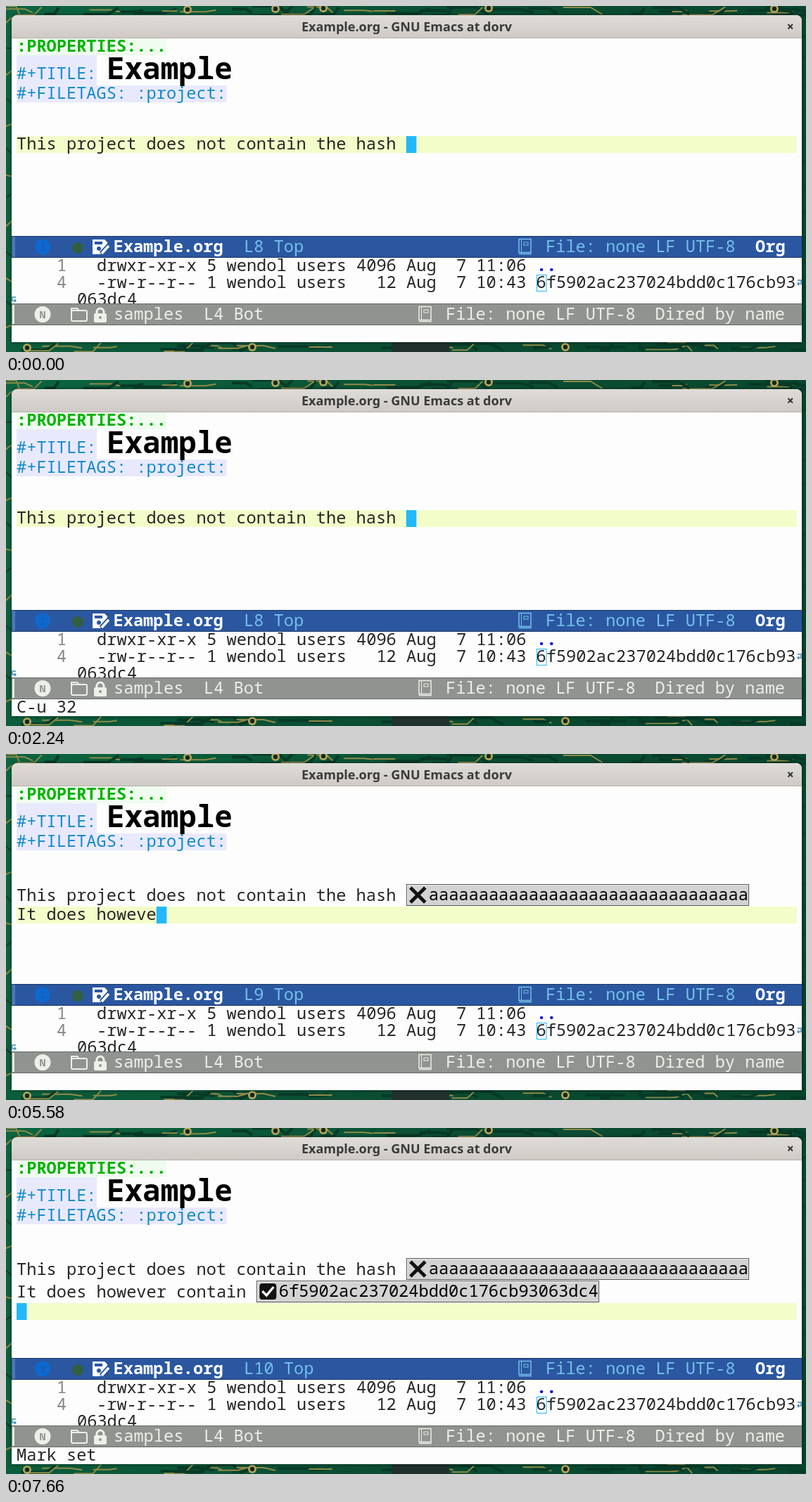
Recreate the animation shown at these times as an HTML page with a canvas. Size 1137 px wide and 492 px high, loop 8 s.

```html
<!DOCTYPE html>
<html lang="en">
<head>
<meta charset="utf-8">
<title>Editor session</title>
<style>
html, body { margin: 0; width: 100%; height: 100%; overflow: hidden; background: #0b5a3a; }
canvas { display: block; width: 1137px; height: 492px; }
</style>
</head>
<body>
<canvas id="stage" width="1137" height="492"></canvas>
<script>
const ctx = document.getElementById('stage').getContext('2d');
const LOOP = 8000, CELL = 14.2, ROW = 24, LEFT = 15, SIZE = CELL / 0.6;
const MONO = '"Noto Sans Mono", "DejaVu Sans Mono", monospace';
const INK = '#262626', PAPER = '#fdfdfd', CURSOR = '#22b8fb', HL = '#f3fdc9';
const HASH = '6f5902ac237024bdd0c176cb93063dc4';
const FIRST = 'This project does not contain the hash ';
const SECOND = 'It does however contain ';

// Bursts of typing: first key, last key, number of keys
const BURSTS = [[4190, 4390, 3], [4550, 4720, 3], [4820, 5310, 6], [5510, 5580, 2], [5740, 6470, 10]];
const ECHO = [[0, ''], [1750, 'C-u-'], [1880, 'C-u 3'], [2210, 'C-u 32'], [2610, 'C-u 32 a'], [3630, ''], [7620, 'Mark set']];

const col = n => LEFT + n * CELL;

function rect(x, y, w, h, color) {
  ctx.fillStyle = color;
  ctx.fillRect(x, y, w, h);
}

function text(s, x, y, color = INK, weight = 400, size = SIZE) {
  ctx.font = `${weight} ${size}px ${MONO}`;
  ctx.fillStyle = color;
  ctx.fillText(s, x, y);
}

function disc(x, y, r, color) {
  ctx.fillStyle = color;
  ctx.beginPath();
  ctx.arc(x, y, r, 0, 7);
  ctx.fill();
}

function line(points, color, width) {
  ctx.strokeStyle = color;
  ctx.lineWidth = width;
  ctx.beginPath();
  points.forEach(([x, y]) => ctx.lineTo(x, y));
  ctx.stroke();
}

function frameBox(x, y, w, h, color, width = 1) {
  ctx.strokeStyle = color;
  ctx.lineWidth = width;
  ctx.strokeRect(x, y, w, h);
}

function rounded(x, y, w, h, r, color) {
  ctx.fillStyle = color;
  ctx.beginPath();
  ctx.roundRect(x, y, w, h, r);
  ctx.fill();
}

function board() {
  const shade = ctx.createLinearGradient(0, 0, 1137, 492);
  shade.addColorStop(0, '#0a6540');
  shade.addColorStop(0.5, '#0b4e33');
  shade.addColorStop(1, '#07442c');
  rect(0, 0, 1137, 492, shade);
  let seed = 11;
  const rnd = () => (seed = seed * 16807 % 2147483647) / 2147483647;
  for (let i = 0; i < 84; i++) {
    const x = rnd() * 1137, y = i % 2 ? 478 : 0, w = 18 + rnd() * 45, a = rnd() * 14;
    const gold = i % 5 < 2;
    line([[x, y + a], [x + w * 0.7, y + a], [x + w, y + 14 - a]], gold ? '#8f8a48' : '#073a27', gold ? 2 : 4);
  }
  for (let i = 0; i < 26; i++) {
    const y = 20 + i * 18 + rnd() * 8, x = i % 2 ? 1131 : 0;
    line([[x, y], [x + 8, y + (rnd() - 0.5) * 16]], i % 4 ? '#073f2a' : '#8d8a45', 2);
  }
  for (const [x, y] of [[258, 5], [383, 4], [451, 3], [686, 3], [1092, 4], [30, 486], [350, 485], [795, 485]]) {
    disc(x, y, 6, '#b5a65b');
    disc(x, y, 3.2, '#14291d');
  }
  rect(548, 478, 82, 14, '#20302c');
}

function windowFrame(title) {
  ctx.save();
  ctx.shadowColor = 'rgba(0,0,0,.5)';
  ctx.shadowBlur = 5;
  rounded(8, 13, 1123, 465, [8, 8, 0, 0], PAPER);
  ctx.restore();
  const bar = ctx.createLinearGradient(0, 13, 0, 45);
  bar.addColorStop(0, '#dfdcd8');
  bar.addColorStop(1, '#cfcac5');
  rounded(8, 13, 1123, 32, [8, 8, 0, 0], bar);
  rect(8, 45, 1123, 1, '#b5afaa');
  ctx.font = '600 18px "Noto Sans", "Open Sans", sans-serif';
  ctx.fillStyle = '#3a3a3a';
  ctx.textAlign = 'center';
  ctx.fillText(title + ' - GNU Emacs at dorv', 569.5, 36);
  ctx.textAlign = 'left';
  line([[1111.5, 26], [1118, 32.5]], '#333', 2);
  line([[1118, 26], [1111.5, 32.5]], '#333', 2);
}

function header() {
  rect(15, 46, 213, ROW, '#effcef');
  text(':PROPERTIES:...', 15, 64.5, '#00b300', 700);
  rect(15, 70, 114, 43, '#e9e9fd');
  rect(15, 113, 298.5, ROW, '#e9e9fd');
  text('#+TITLE:', 15, 104, '#118bcb');
  text('Example', 143, 104, '#000', 700, SIZE * 1.8);
  text('#+FILETAGS: :project:', 15, 131.5, '#118bcb');
}

const highlight = (y, h = ROW) => rect(15, y, 1109, h, HL);
const cursor = (n, y, h = ROW) => rect(col(n), y, CELL + 0.3, h, CURSOR);

function button(n, y, label, found, raised) {
  const x = col(n) + 0.5, w = CELL * 34.25;
  if (raised) {
    rect(x, y, w, 30, '#d3d3d3');
    line([[x + 1, y + 29], [x + 1, y + 1.5], [x + w, y + 1.5]], '#f0f0f0', 1);
  }
  frameBox(x, y + 0.5, w, 30, '#555');
  if (found) {
    rounded(x + 4, y + 4, 24, 23, 4, '#111');
    line([[x + 8, y + 15], [x + 14, y + 21], [x + 24, y + 9]], '#fff', 3.4);
  } else {
    line([[x + 5.5, y + 5], [x + 26.5, y + 26]], '#111', 5);
    line([[x + 26.5, y + 5], [x + 5.5, y + 26]], '#111', 5);
  }
  text(label, col(n + 2.25), y + 23, '#000');
}

function typedCount(t) {
  return BURSTS.reduce((sum, [a, b, n]) =>
    sum + (t < a ? 0 : Math.min(n, 1 + Math.floor((t - a) * (n - 1) / (b - a) + 1e-6))), 0);
}

function body(t, prompting) {
  const as = 'a'.repeat(32);
  if (t < 3100) {
    highlight(185);
    const line1 = FIRST + (t < 2610 ? '' : as);
    text(line1, LEFT, 203.5);
    cursor(line1.length, 185);
    return;
  }
  const firstLine = t < 3630;
  if (firstLine) highlight(185, 32);
  text(FIRST, LEFT, 208.5);
  button(39, 185, as, false, !firstLine);
  if (firstLine) {
    cursor(73.3, 185, 32);
  } else if (t < 7620) {
    const n = typedCount(t);
    highlight(217);
    text(SECOND.slice(0, n), LEFT, 235.5);
    if (prompting) frameBox(col(n) + 0.5, 217.5, 13.5, ROW - 1, CURSOR);
    else cursor(n, 217);
  } else {
    text(SECOND, LEFT, 240.5);
    button(24, 217, HASH, true, true);
    highlight(249);
    cursor(0, 249);
  }
}

function book(x, y, color) {
  frameBox(x, y - 10.5, 17, 19, color, 1.5);
  line([[x, y + 10.5], [x + 18, y + 10.5]], color, 1.5);
  line([[x + 3.5, y - 10], [x + 3.5, y + 8]], color, 1);
  frameBox(x + 7, y - 6, 6, 4, color, 1);
}

function modeBar(y, color, edge) {
  rect(8, y, 1123, 31, color);
  rect(8, y, 1123, 1, edge);
  rect(8, y + 30, 1123, 1, edge);
}

function activeBar(row) {
  const sky = '#74c0ea', blue = '#2b57a0';
  modeBar(327, blue, '#183665');
  rect(9, 328, 4, 29, '#4e77b6');
  disc(52, 342.5, 11, '#0d68d0');
  text('I', 48, 348, '#1c5db8', 700, 14);
  disc(102, 344, 8, '#315f40');
  ctx.fillStyle = '#fff';
  ctx.beginPath();
  [[123, 332], [140, 332], [144, 336], [144, 340], [134, 353], [123, 353]].forEach(p => ctx.lineTo(...p));
  ctx.fill();
  rect(126, 335, 11, 4, blue);
  disc(132, 345, 3, blue);
  line([[135, 352], [146, 340]], blue, 6);
  line([[136, 352], [146, 341]], '#fff', 3.5);
  text('Example.org', 152.5, 350, '#fff', 700);
  text(`L${row} Top`, 338, 350, sky);
  book(729, 342, sky);
  text('File: none LF UTF-8', 767, 350, sky);
  text('Org', 1065, 350, '#fff', 700);
}

function wrapMark(x, y, dir) {
  line([[x - 3 * dir, y - 3], [x + 2 * dir, y - 3], [x + 2 * dir, y + 2], [x - 3 * dir, y + 2]], '#3b8bc0', 1.4);
  line([[x - dir, y], [x - 3 * dir, y + 2], [x - dir, y + 4]], '#3b8bc0', 1.4);
}

function listing() {
  ctx.save();
  ctx.beginPath();
  ctx.rect(8, 358, 1123, 65);
  ctx.clip();
  rect(8, 358, 1123, 65, PAPER);
  text('1', 72, 377, '#858585');
  text('drwxr-xr-x 5 wendol users 4096 Aug  7 11:06', 129, 377);
  text('..', 754, 377, '#0000d4', 700);
  text('4', 72, 401, '#858585');
  text('-rw-r--r-- 1 wendol users   12 Aug  7 10:43 ' + HASH.slice(0, 26), 129, 401);
  frameBox(754.5, 382.5, 13.5, ROW - 1, CURSOR);
  text(HASH.slice(26), 101, 425);
  wrapMark(1128, 393, 1);
  wrapMark(11, 417, -1);
  ctx.restore();
}

function idleBar() {
  const pale = '#edf0e8', gray = '#90938f';
  modeBar(423, gray, '#666b68');
  rect(9, 425, 3, 27, '#e4e8e2');
  disc(52, 438.5, 11.5, pale);
  text('N', 47.6, 444, gray, 700, 15);
  ctx.strokeStyle = pale;
  ctx.lineWidth = 2;
  ctx.beginPath();
  ctx.roundRect(93, 433, 22, 15, 2);
  ctx.stroke();
  line([[93, 435], [93, 430], [101, 430], [104, 433]], pale, 2);
  rounded(125, 437, 18, 13, 2, pale);
  ctx.strokeStyle = pale;
  ctx.lineWidth = 3;
  ctx.beginPath();
  ctx.arc(134, 435, 5, Math.PI, 0);
  ctx.lineTo(139, 438);
  ctx.moveTo(129, 435);
  ctx.lineTo(129, 438);
  ctx.stroke();
  disc(134, 443, 2, gray);
  text('samples', 153, 446, pale);
  text('L4 Bot', 281, 446, pale);
  book(587, 438, pale);
  text('File: none LF UTF-8', 625, 446, pale);
  text('Dired by name', 922.5, 446, pale);
}

function prompt() {
  rect(15, 426, 28 * CELL, ROW, '#ffd200');
  text('1/1    Yank from kill-ring: ', 15, 444.5, '#262000', 700);
  cursor(28, 426);
  rect(15, 450, 1109, 28, '#b2d4fc');
  text(HASH, 15, 472.5);
  const x = col(32);
  line([[x + 11, 459], [x + 11, 468], [x + 3, 468]], '#8a93a0', 1.6);
  line([[x + 7, 464], [x + 3, 468], [x + 7, 472]], '#8a93a0', 1.6);
}

function draw(t) {
  const prompting = t >= 6930 && t < 7620;
  const row = t < 3630 ? 8 : t < 7620 ? 9 : 10;
  board();
  windowFrame(prompting ? '*Minibuf-1*' : 'Example.org');
  header();
  body(t, prompting);
  ctx.save();
  if (prompting) ctx.translate(0, -29);
  activeBar(row);
  listing();
  idleBar();
  ctx.restore();
  if (prompting) prompt();
  else text(ECHO.findLast(([start]) => t >= start)[1], LEFT, 472.5);
}

const begin = performance.now();
function tick() {
  draw((performance.now() - begin) % LOOP);
  requestAnimationFrame(tick);
}
tick();
</script>
</body>
</html>
```
